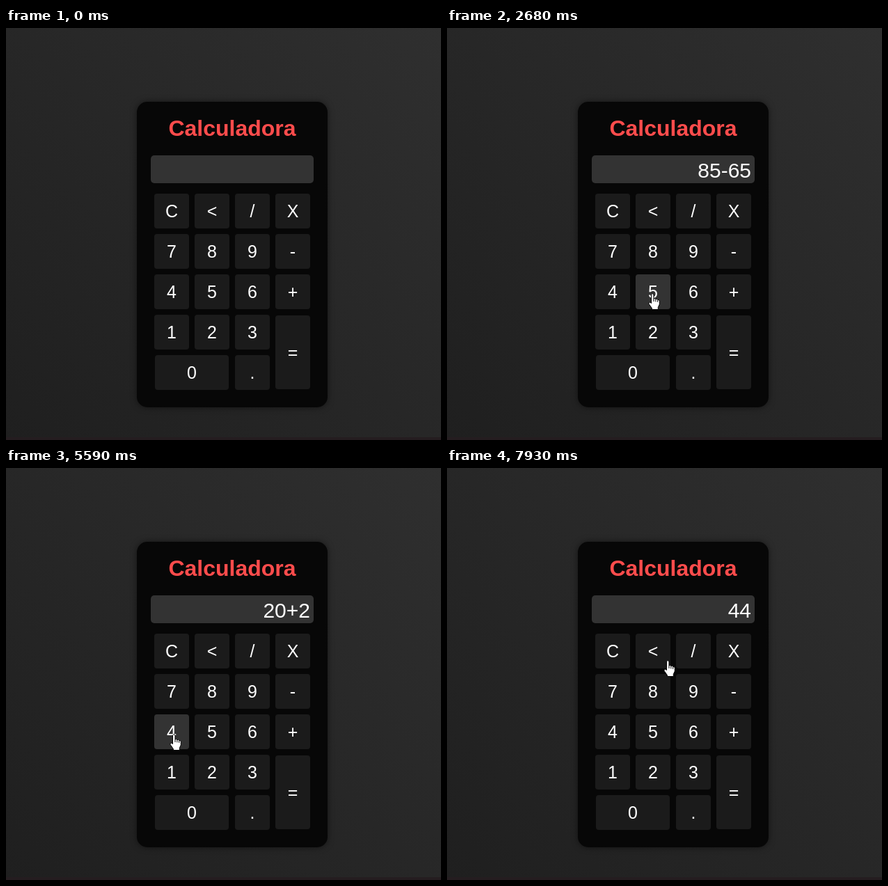
These frames come from a looping animation (625x592 px, 8 s). An HTML page:

```html
<!DOCTYPE html>
<html lang="pt">
<head>
<meta charset="utf-8">
<title>Calculadora</title>
<style>
  html, body { margin: 0; width: 100%; height: 100%; overflow: hidden; }
  body { background: linear-gradient(45deg, #1f1f1f, #2f2f2f); }
  svg { display: block; position: absolute; left: 0; top: 0; }
  text { font-family: "Liberation Sans", Arial, sans-serif; fill: #fff; text-anchor: middle; }
  .panel { fill: #070707; filter: drop-shadow(0 0 5px rgba(0, 0, 0, .5)); }
  .title { font-size: 32px; font-weight: bold; fill: #ff4c4c; }
  .screen { font-size: 30px; text-anchor: end; }
  .key rect { fill: #1b1b1b; }
  .key.on rect { fill: #333; }
  .key text { font-size: 25px; }
  #cursor path { fill: #fff; stroke: #000; stroke-linejoin: round; }
</style>
</head>
<body>
<svg width="625" height="592" viewBox="0 0 625 592">
  <rect y="588" width="625" height="4" fill="#251d20"/>
  <rect class="panel" x="188" y="106" width="274" height="439" rx="15"/>
  <text class="title" x="325" y="155">Calculadora</text>
  <rect x="208" y="183" width="234" height="40" rx="5" fill="#333"/>
  <text class="screen" id="screen" x="437" y="215"></text>
  <g id="keys"></g>
  <g id="cursor">
    <path id="arrow" d="M0 0V16.6L3.7 13.2L6.4 19.2L9 18.1L6.4 12.2H11.6Z"/>
    <g id="hand">
      <path d="M-1.5 1Q.2-2 2 1V7Q3.8 6 4.9 7.6Q6.7 6.8 7.7 8.4Q10 8 10.3 10.3V15L8.3 19.4V22.5H-.6V20.6L-5 14.4Q-5 10-1.5 13.5Z"/>
      <path d="M2 7V11M4.9 8V11.4M7.7 8.8V11.8" style="fill:none"/>
    </g>
  </g>
</svg>
<script>
const LOOP = 8000, STEP = 66.6, LAG = 20;
const $ = id => document.getElementById(id);
const NS = 'http://www.w3.org/2000/svg';

function add(parent, tag, attrs, text) {
  const el = document.createElementNS(NS, tag);
  for (const k in attrs) el.setAttribute(k, attrs[k]);
  if (text) el.textContent = text;
  return parent.appendChild(el);
}

const keys = [];
function addKey(label, x, y, w = 50, h = 50) {
  const g = add($('keys'), 'g', { class: 'key' });
  add(g, 'rect', { x, y, width: w, height: h, rx: 4 });
  add(g, 'text', { x: x + w / 2, y: y + h / 2 + 9 }, label);
  keys.push({ g, x, y, w, h });
}
['C</X', '789-', '456+', '123'].forEach((row, r) =>
  [...row].forEach((c, i) => addKey(c, 213 + 58 * i, 238 + 58 * r)));
addKey('0', 214, 470, 106);
addKey('.', 329, 470);
addKey('=', 387, 413, 50, 106);

const entries = [];
const show = (start, text) => entries.push({ start, text });
show(0, '');
show(1030, '8');
show(1430, '85');
show(1840, '85-');
show(2240, '85-6');
show(2680, '85-65');
show(3425, '20');
show(4780, '20+');
show(5380, '20+2');
show(5720, '20+24');
show(7180, '44');

// Pointer moves: evenly timed x, y pairs; it rests between moves
const moves = [];
const go = (start, end, ...xy) => moves.push({ start, end, xy });
go(0, 0, -50, -50);
go(200, 866, 462, 544, 400, 505, 342, 459, 318, 400, 297, 328);
go(1030, 1300, 297, 326, 296, 375);
go(1500, 1760, 300, 385, 365, 404, 405, 400, 409, 328);
go(1973, 2039, 407, 326, 399, 334, 390, 343, 385, 351);
go(2106, 2173, 385, 351, 350, 372);
go(2306, 2600, 350, 375, 324, 385, 295, 382);
go(2680, 3079, 295, 382, 352, 403, 405, 445);
go(3290, 3290, 408, 446);
go(3490, 4022, 408, 446, 426, 415, 428, 394);
go(4100, 4166, 422, 390, 417, 386);
go(4630, 4630, 409, 374);
go(4780, 5312, 409, 374, 325, 409, 303, 438);
go(5520, 5586, 290, 410, 241, 383);
go(5787, 6280, 241, 383, 314, 472, 354, 492);
go(6350, 6549, 374, 488, 440, 472, 453, 476);
go(6700, 7033, 453, 476, 420, 477, 416, 477);
go(7250, 7450, 416, 476, 410, 381);
go(7520, 7918, 404, 375, 380, 352, 346, 318, 317, 277);

const latest = (list, t) => list.filter(e => e.start <= t).pop();

function pointAt(t) {
  const { start, end, xy } = latest(moves, t);
  const last = xy.length / 2 - 1;
  const u = end > start ? Math.min(1, (t - start) / (end - start)) * last : 0;
  const i = Math.min(Math.floor(u), Math.max(0, last - 1)), k = u - i;
  const mix = c => xy[2 * i + c] + (k ? (xy[2 * i + 2 + c] - xy[2 * i + c]) * k : 0);
  return [mix(0), mix(1)];
}

const keyAt = ([x, y]) =>
  keys.find(k => x >= k.x && x < k.x + k.w && y >= k.y && y < k.y + k.h);

function draw() {
  const t = performance.now() % LOOP;
  const { start } = latest(moves, t);
  const q = start + Math.floor((t - start) / STEP) * STEP;
  const pos = pointAt(q), lit = keyAt(pointAt(Math.max(0, q - LAG))), over = !!keyAt(pos);

  $('screen').textContent = latest(entries, t).text;
  for (const k of keys) k.g.classList.toggle('on', k === lit);
  $('cursor').setAttribute('transform', `translate(${pos.map(Math.round)})`);
  $('arrow').style.display = over ? 'none' : '';
  $('hand').style.display = over ? '' : 'none';
  requestAnimationFrame(draw);
}
draw();
</script>
</body>
</html>
```
